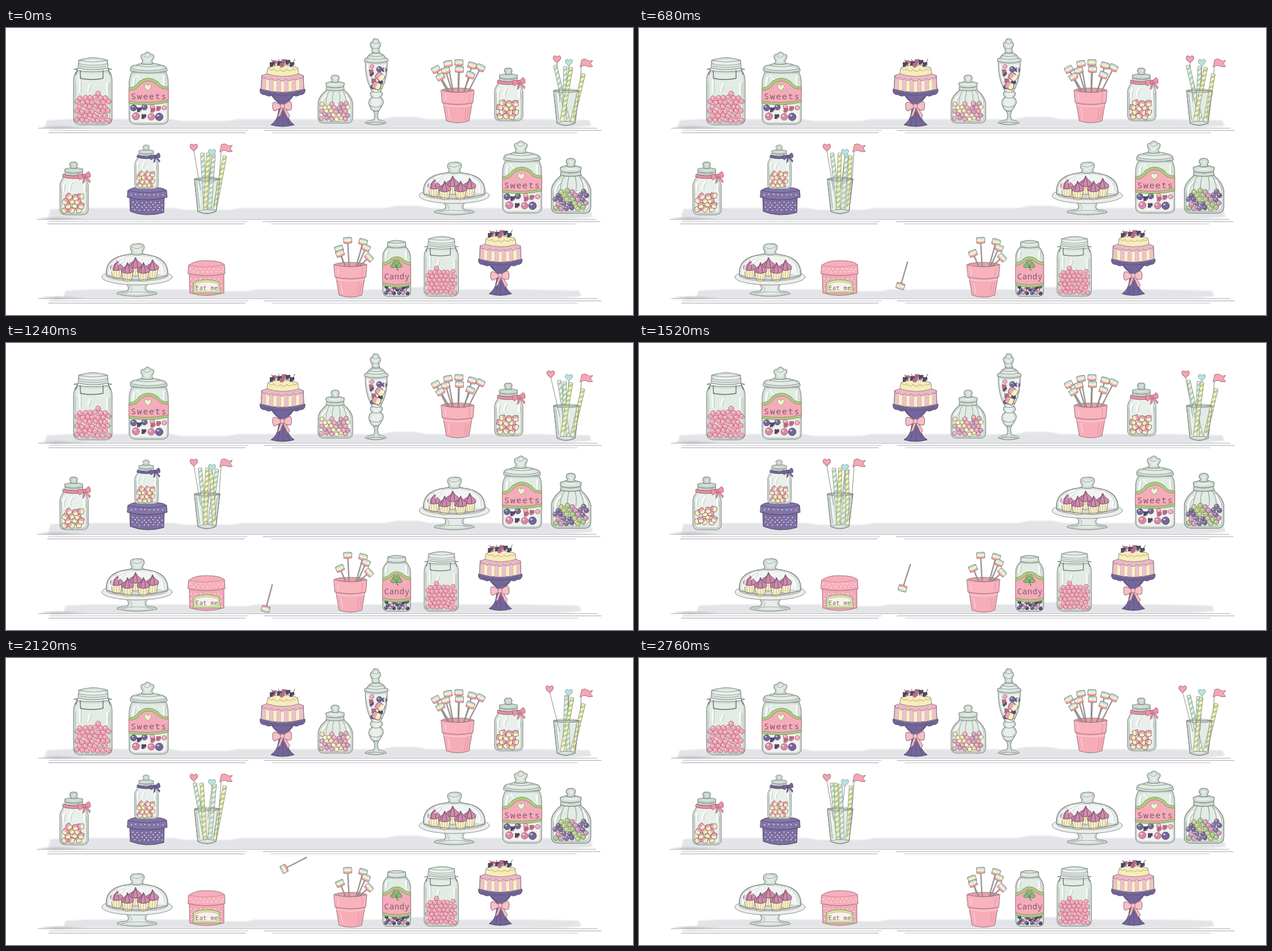
Recreate the animation shown at these times as an HTML page with a canvas. Size 1105 by 507 pixels, loop 2.8 s.

```html
<!DOCTYPE html>
<html lang="en">
<head>
<meta charset="utf-8">
<title>Candy shelves</title>
<style>
html,body{margin:0;width:100%;height:100%;overflow:hidden;background:#fff}
canvas{display:block;width:100vw;height:100vh}
</style>
</head>
<body>
<canvas></canvas>
<script>
const W = 1105, H = 507, LOOP = 2800, STEP = 40;
const canvas = document.querySelector('canvas'), g = canvas.getContext('2d');
const dpr = window.devicePixelRatio || 1;
canvas.width = W * dpr;
canvas.height = H * dpr;

const INK = '#7d8581', GLASS = '#e2ebe4', CLEAR = '#f1f4f2', PINK = '#f5acba', ROSE = '#f2a5b6', CREAM = '#f8f2c4',
  MINT = '#b9e3df', GREEN = '#a9d07c', VIOLET = '#74669a', DARK = '#4b4263';
const HAND = '"Noto Sans Mono","DejaVu Sans Mono",monospace';

let seed = 1;
const rnd = () => (seed = seed * 16807 % 2147483647) / 2147483647;
const jit = a => (rnd() - .5) * 2 * a;

function shape(d, fill, stroke = INK, w = 1) {
  const p = new Path2D(d);
  if (fill) { g.fillStyle = fill; g.fill(p); }
  if (stroke) { g.strokeStyle = stroke; g.lineWidth = w; g.stroke(p); }
}
// glass wall: darker towards its edge
function vessel(d, fill = GLASS) {
  shape(d, fill, null);
  g.save();
  g.clip(new Path2D(d));
  shape(d, null, 'rgba(125,150,135,.2)', 7);
  g.restore();
  shape(d, null, INK, 1.1);
}
function oval(x, y, rx, ry, fill, stroke, w = .9) {
  g.beginPath();
  g.ellipse(x, y, rx, ry, 0, 0, 7);
  if (fill) { g.fillStyle = fill; g.fill(); }
  if (stroke) { g.strokeStyle = stroke; g.lineWidth = w; g.stroke(); }
}
function at(x, y, s, a, draw) {
  g.save();
  g.translate(x, y);
  g.rotate(a);
  g.scale(s, s);
  draw();
  g.restore();
}
function write(s, x, y, size, gap) {
  g.font = '300 ' + size + 'px ' + HAND;
  g.letterSpacing = gap + 'px';
  g.textAlign = 'left';
  g.fillStyle = '#7d5c6a';
  g.fillText(s, x, y);
}
function ball(x, y, r, fill, edge = '#a9566f') {
  oval(x, y, r, r, fill, edge, .8);
  oval(x - r * .3, y - r * .35, r * .32, r * .25, 'rgba(255,255,255,.65)');
}
function pile(x0, x1, bottom, top, dx, dy, put) {
  for (let y = bottom, odd = 0; y >= top; y -= dy, odd ^= 1)
    for (let x = x0 + odd * dx / 2; x <= x1; x += dx) {
      const px = x + jit(1.1), py = y + jit(1.3);
      if (py >= top + 5 * Math.abs(Math.sin(x * .13))) put(px, py);
    }
}
// soft pencil streaks inside glass
function sheen(d) {
  shape(d, null, 'rgba(255,255,255,.75)', 3);
  g.save();
  g.translate(2.5, 1);
  shape(d, null, 'rgba(110,120,115,.4)', .9);
  g.restore();
}
function berry(x, y) {
  for (let i = 0; i < 8; i++)
    oval(x + (i % 3 - 1) * 2.5, y + (i / 3 | 0) * 2.5 - 3, 1.8, 1.8, i % 2 ? '#5f5478' : '#40394f');
}
function raspberry(x, y) {
  for (let i = 0; i < 8; i++)
    oval(x + (i % 3 - 1) * 2.4, y + (i / 3 | 0) * 2.4 - 3, 1.7, 1.7, '#cf7f9c', '#84465f', .5);
}
function heart(x, y, s, fill, edge) {
  at(x, y, s, 0, () => shape('M0 6Q-8 0 -6 -4Q-3 -8 0 -3Q3 -8 6 -4Q8 0 0 6Z', fill, edge));
}
function bow(x, y, s, fill, edge, tilt = 0) {
  at(x, y, s, tilt, () => {
    shape('M-2 2L-7 16L-3 14L1 3L8 18L11 14L3 1Z', fill, edge, .9);
    shape('M0 0Q-12 -9 -14 -4Q-15 7 -11 7Q-6 5 0 1Q8 8 13 5Q15 -7 10 -7Q5 -5 0 0Z', fill, edge);
    oval(0, 0, 3, 3.4, fill, edge);
  });
}

function shelf(y, x, washTop, from, to) {
  g.filter = 'blur(.8px)';
  shape(`M${from} ${washTop + 2}L${from + 40} ${washTop}H${from + 220}L${from + 235} ${washTop + 3}H${from + 320}L${from + 335} ${washTop}
    H${from + 590}L${from + 610} ${washTop - 4}H${from + 650}L${from + 670} ${washTop}H${to - 90}L${to} ${washTop + 2}L${to + 4} ${y - 4}L${to - 40} ${y - 1}H${from - 4}Z`, '#e3e4e7', null);
  shape(`M${x + 2} ${y - 2}L${x + 35} ${y - 4}L${x + 85} ${y - 1}L${x + 30} ${y + 1}Z`, '#c9cacd', null);
  g.filter = 'none';
  const line = (a, b, yy, w, col) => shape(`M${a} ${yy}L${b} ${yy}`, null, col, w);
  line(x, x + 985, y, 1.1, '#a8a5ad');
  line(x + 20, x + 370, y + 4, 1, '#b8b5bd');
  line(x + 398, x + 992, y + 4, 1.2, '#a09da8');
  line(x + 18, x + 365, y + 8, 1, '#9d99a4');
  line(x + 412, x + 950, y + 8, 1, '#bbb9c1');
}

function mason(x, y, s) {
  at(x, y, s, 0, () => {
    vessel('M8 24Q1 30 1 42V110Q2 119 12 120H58Q68 119 69 110V42Q69 30 62 24Q35 28 8 24Z');
    sheen('M12 34V62M60 46V66M30 48L26 60');
    pile(8, 63, 112, 62, 9, 8, (a, b) => ball(a, b, 4.4, ROSE));
    shape('M5 44V110Q8 117 14 117H56Q65 116 65 108V46', null, '#a9b2ac', .8);
    vessel('M10 6Q36 -3 61 6L62 20Q36 26 9 20Z', '#e9f0eb');
    shape('M10 6Q36 12 61 6M10 12Q36 18 62 12M12 16Q40 21 58 16', null, INK, .8);
    shape('M13 24V38Q33 42 53 38V24M2 22L8 21L5 31M68 22L62 21L66 31', null, '#66706c', 1.4);
  });
}

function sweets(x, y) {
  at(x, y, 1, 0, () => {
    vessel('M6 36Q1 45 1 55V118Q2 127 12 128H60Q70 127 70 118V55Q70 45 66 36Z');
    sheen('M10 46L8 60M62 44V58M16 42L24 50');
    shape('M4 94H67V118Q66 124 58 124H12Q4 124 4 118Z', '#f3f2ee', null);
    ball(9, 99, 5.5, VIOLET, DARK); ball(28, 98, 5, VIOLET, DARK); ball(42, 97, 4, PINK);
    ball(13, 114, 6.5, '#d58ba9'); ball(54, 115, 6.8, VIOLET, DARK); ball(63, 99, 4, PINK);
    ball(40, 115, 6, '#d58ba9'); raspberry(43, 104); raspberry(53, 101); berry(27, 115); berry(19, 103); 
    shape('M1 64Q12 63 18 53Q35 40 52 53Q58 63 70 62V89Q35 97 1 91Z', GREEN, '#7c9a5d');
    shape('M1 68Q15 68 21 57Q35 46 49 57Q56 67 70 66V85Q35 93 1 87Z', PINK, '#b77a86');
    heart(34, 63, .95, '#eef3d8', '#8fae5e');
    write('Sweets', 4, 84, 15, 1.7);
    vessel('M3 34Q2 24 14 23Q34 16 56 23Q68 25 68 34Q35 41 3 34Z', '#e4ece6');
    shape('M5 30Q35 37 66 30M14 24Q34 29 56 24', null, INK, .8);
    vessel('M22 21Q27 16 23 13Q19 4 28 4Q33 -3 39 4Q48 5 43 13Q39 17 44 21Q33 24 22 21Z');
    shape('M27 8Q33 13 39 7', null, INK, .7);
  });
}

function cake(x, y, s) {
  at(x, y, s, 0, () => {
    shape('M1 56Q-1 66 10 66Q16 70 21 67Q26 75 33 80L35 85L33 97Q31 112 20 119Q40 125 61 119Q50 112 48 97L46 85L48 80Q55 75 60 67Q65 70 71 66Q81 66 80 56Q40 67 1 56Z', VIOLET, DARK);
    shape('M36 98L32 120M41 98V121M45 98L52 119M22 67L34 79M59 67L48 78M8 62Q40 72 73 62', null, '#5a4e80', .9);
    g.save();
    const side = 'M4 32Q40 18 77 32L78 56Q40 67 3 56Z';
    shape(side, CREAM);
    g.clip(new Path2D(side));
    for (let i = 0; i < 6; i++) shape(`M${5 + i * 13} 26L${3 + i * 13.5} 67H${10 + i * 13.5}L${11 + i * 13} 26Z`, '#f0c0cd', '#cfa3b0', .7);
    g.restore();
    shape(side, null, '#8c7f80');
    shape('M4 32Q40 16 77 32Q76 40 70 36Q66 43 59 37Q53 45 46 38Q40 46 33 38Q27 44 21 37Q15 43 11 36Q5 40 4 32Z', '#ecb6c6', '#8f7a82', .9);
    shape('M15 18Q40 8 67 18L69 29Q42 38 13 29Z', '#f6edbb', '#8f8878');
    shape('M15 18Q20 25 25 20Q31 28 36 21Q42 28 48 21Q54 27 59 20Q64 25 67 18', null, '#cdb58c', 1.2);
    shape('M21 4L27 14M62 3L57 13M33 3L36 9', null, '#7d965c', 1.3);
    raspberry(26, 10); berry(35, 11); raspberry(43, 8); berry(50, 9); berry(57, 13); berry(22, 13); raspberry(40, 14);
    bow(40, 86, 1.2, '#f5c0c7', '#a8747f');
  });
}

function roundJar(x, y, s, colors, hop) {
  at(x, y, s, 0, () => {
    vessel('M18 26Q2 38 1 50V78Q2 85 10 86H54Q61 85 62 78V50Q60 38 45 26Z');
    sheen('M14 38Q7 44 7 54M50 36Q56 44 56 50');
    shape('M22 27Q14 40 15 54M29 27Q25 40 26 52M37 27Q41 38 39 52M43 27Q52 40 50 52', null, '#8d9992', .9);
    shape('M5 58Q31 48 58 58V76Q57 82 50 82H12Q5 81 5 76Z', 'rgba(246,247,245,.8)', null);
    let i = 0;
    pile(8, 56, 78, 48, 8.4, 6.4, (a, b) => ball(a, b, 3.9, colors[i++ * 7 % 5], '#7a6672'));
    if (hop) ball(39 + 6 * hop / 20, 54 - hop * .85, 3.9, PINK, '#8a5565');
    vessel('M16 21Q31 26 46 21L47 27Q31 31 15 27Z', '#e5ede7');
    vessel('M15 15Q31 9 47 15Q48 21 44 22Q31 25 17 22Q14 19 15 15Z', '#e5ede7');
    vessel('M24 13Q28 10 24 8Q23 1 31 1Q39 1 38 8Q35 11 38 13Q31 16 24 13Z');
    shape('M4 52V77Q8 83 14 83H50Q58 82 59 76', null, '#9eaaa3', .8);
  });
}

function urn(x, y) {
  at(x, y, 1, 0, () => {
    vessel('M15 128Q20 136 16 144Q2 146 1 150Q19 156 38 150Q37 146 25 144Q21 136 25 128Z');
    vessel('M1 41Q20 45 40 41Q41 68 31 88L28 94Q35 98 28 104Q37 111 30 120Q26 130 20 129Q12 130 9 120Q4 111 13 104Q7 98 13 94L10 88Q1 70 1 41Z', '#e9f0eb');
    shape('M10 88Q20 93 31 88M13 94Q20 98 28 94M13 104Q20 108 28 104M9 119Q20 125 30 119M5 150Q19 146 34 150', null, INK, .9);
    berry(12, 64); berry(28, 80); ball(26, 55, 5, VIOLET, DARK); ball(13, 50, 3.5, PINK); ball(35, 56, 4, '#625a85', DARK);
    raspberry(11, 60); raspberry(16, 76); ball(14, 86, 3.5, '#625a85', DARK);
    [[27, 68, .7], [21, 84, .4]].forEach(([a, b, r]) => at(a, b, 1.5, r, mallow));
    sheen('M5 48Q6 62 11 76M36 48Q36 62 32 72');
    vessel('M0 41Q-2 36 4 35Q8 26 20 25Q33 26 37 35Q43 36 41 41Q20 47 0 41Z');
    shape('M4 35Q20 40 37 35M9 31Q20 34 32 31', null, INK, .8);
    vessel('M13 25Q14 20 12 17Q7 9 14 6Q15 0 20 1Q25 1 25 6Q31 10 26 17Q24 20 27 25Q20 28 13 25Z');
    shape('M14 8Q19 12 25 8M12 17Q19 20 26 17', null, INK, .7);
  });
}

function pop(x, y, angle, len = 43) {
  at(x, y, 1, angle, () => {
    shape(`M3 0H${len}`, null, '#77716f', 2.2);
    shape(`M4 0H${len - 1}`, null, '#c3bbb3', .8);
    ['#f2a6b4', CREAM, MINT].forEach((c, i) => shape(`M${4 - i * 3.6} -7Q${5.5 - i * 3.6} 0 ${4 - i * 3.6} 7H${.2 - i * 3.6}Q${1.6 - i * 3.6} 0 ${.2 - i * 3.6} -7Z`, c, null));
    shape('M4 -7Q5.6 0 4 7H-5.5Q-7.5 0 -5.5 -7Z', null, '#857572', .9);
  });
}
function pot(x, y, heads) {
  at(x, y, 1, 0, () => {
    oval(30, 4, 28, 4, '#e5a0ac', '#9a6b75');
    heads.forEach(([a, b]) => {
      const bx = 30 + (a - 30) * .45, dx = bx - a, dy = 8 - b;
      pop(a, b, Math.atan2(dy, dx), Math.hypot(dx, dy));
    });
    shape('M4 23L10 58Q30 65 50 58L56 23Z', '#f6adb8', '#98707a');
    shape('M1 4Q30 12 59 4L57 26Q30 32 3 26Z', '#f8b3bd', '#98707a');
    shape('M4 30Q30 36 55 30M8 12L9 22M13 36L16 54', null, 'rgba(255,255,255,.4)', 1.6);
    shape('M45 36L42 56M50 36L46 56M51 10L50 24', null, '#e595a3', 1.1);
  });
}

function mallow() {
  shape('M0 -4H-4Q-6 0 -4 4H0Z', '#f0a3b3', null);
  shape('M0 -4H4Q6 0 4 4H0Z', '#f7f0bd', null);
  shape('M-4 -4H4Q6 0 4 4H-4Q-6 0 -4 -4Z', null, '#7d6868', .8);
}
function bowJar(x, y, s, ribbon, edge, hop = 0) {
  at(x, y, s, 0, () => {
    vessel('M8 27Q1 36 1 42V86Q2 93 10 94H42Q50 93 51 86V42Q50 36 44 27Z', '#e9f0eb');
    sheen('M9 38Q6 44 7 52M44 38V52M22 36Q16 44 18 50');
    pile(10, 44, 86, 54, 11.5, 7.8, (a, b) => {
      const up = rnd(), turn = rnd() * 3;
      at(a, b - hop * up * 15, 1.12, turn + hop * up, mallow);
    });
    shape('M4 44V85Q6 91 12 91H42Q48 90 48 84V44', null, '#98a49c', .8);
    vessel('M10 18Q25 23 41 18V24H10Z');
    vessel('M10 13Q25 8 41 13Q42 18 39 19Q25 22 12 19Q8 17 10 13Z', '#d9e3dc');
    vessel('M19 11Q22 9 18 6Q19 0 25 1Q32 0 32 6Q29 9 32 11Q25 14 19 11Z', '#d9e3dc');
    shape('M7 22Q25 29 45 22L46 27Q25 33 6 27Z', ribbon, edge);
    bow(44, 25, .8, ribbon, edge, -.2);
  });
}

const KEYS = [0, 360, 960, 1240, 1760, 2120, 2760];
function pose(v, t) {
  let i = 0;
  while (i < 5 && t >= KEYS[i + 1]) i++;
  const u = Math.min(1, (t - KEYS[i]) / (KEYS[i + 1] - KEYS[i]));
  return v[i] + (v[i + 1] - v[i]) * (1 - Math.cos(Math.PI * u)) / 2;
}
function straw(x0, y0, x1, y1, color) {
  const len = Math.hypot(x1 - x0, y1 - y0);
  at(x0, y0, 1, Math.atan2(y1 - y0, x1 - x0) - Math.PI / 2, () => {
    shape(`M-3 0H3V${len}H-3Z`, '#faf4d0', null);
    for (let y = 1; y < len - 7; y += 9) shape(`M-3 ${y + 4}L3 ${y}V${y + 4.5}L-3 ${y + 8.5}Z`, color, null);
    shape(`M-3 0H3V${len}H-3Z`, null, '#858a7e', .8);
  });
}
function glass(x, y, t, straws, red, mint, flag) {
  at(x, y, 1, 0, () => {
    const cup = 'M1 3L7 60Q23 68 39 60L46 3Z';
    vessel(cup);
    const stick = (a, b, c, d) => shape(`M${a} ${b}L${c} ${d}`, null, '#8b8a88', 1);
    stick(red, -48, 12, 22);
    stick(mint[0], mint[1] + 5, 25, 20);
    stick(flag[0], flag[1], flag[0] - 5, 10);
    straws.forEach(([top, end, high, color]) => straw(pose(top, t), high, end, 57, color));
    heart(red, -53, 1.05, '#f6a3b1', '#a8707b');
    heart(mint[0], mint[1], 1, MINT, '#7fa5a4');
    at(flag[0], flag[1], 1, 0, () => shape('M0 0Q6 -3 10 1Q14 4 19 1L15 7L19 12Q13 14 8 11Q3 9 -3 13Z', '#f6a6b4', '#a8707b'));
    shape(cup, 'rgba(226,238,230,.12)');
    oval(23.5, 3, 22.5, 3, null, INK);
    shape('M5 8L10 54M41 9L36 52M9 59Q23 54 37 59', null, '#96a29b', .9);
    shape('M8 12L12 46', null, 'rgba(255,255,255,.6)', 1.6);
  });
}

function cupcake(x, y) {
  at(x, y, 1, 0, () => {
    shape('M-10 0L-7 16Q0 19 7 16L10 0Z', '#f8f0c8', '#7d7364', .9);
    shape('M-5 3L-4 16M0 3V17M5 3L4 16', null, '#bfb287', .9);
    shape('M-10 1Q-13 -5 -6 -7Q-1 -10 0 -16Q3 -10 7 -7Q13 -4 10 1Q0 6 -10 1Z', '#cd8bad', '#654358', .9);
    shape('M-4 2Q-5 -5 0 -13M3 2Q5 -4 0 -13M-8 0Q-7 -5 -3 -8', null, '#824a6c', 1);
  });
}
function dome(x, y) {
  at(x, y, 1, 0, () => {
    vessel('M43 72Q52 82 44 86Q26 87 28 91Q62 99 98 91Q99 87 82 86Q74 82 83 72Z', '#e6ece8');
    shape('M35 90Q62 84 92 90M50 76Q57 82 52 87', null, '#98a39c', .9);
    oval(63, 61, 62, 14, '#eceeec', INK);
    oval(63, 58, 54, 10, '#d3d6d4', '#8e9691');
    const bell = 'M9 58Q5 21 63 20Q120 21 117 58Q63 74 9 58Z';
    vessel(bell, CLEAR);
    oval(63, 60, 46, 7, '#d6d9d7');
    cupcake(60, 42);
    cupcake(27, 46); cupcake(90, 46);
    cupcake(46, 51); cupcake(74, 51);
    shape(bell, null, INK, 1.1);
    sheen('M18 50Q18 32 40 26M108 52Q110 36 92 27M30 38L40 29');
    vessel('M52 20Q56 16 52 13Q48 2 62 2Q79 1 75 12Q71 17 74 20Q63 24 52 20Z');
    shape('M54 8Q63 14 73 7', null, INK, .7);
  });
}

function dots(x0, y0, x1, y1) {
  for (let y = y0, k = 0; y <= y1; y += 4.5, k ^= 1)
    for (let x = x0 + k * 4; x <= x1; x += 8) oval(x + jit(1), y + jit(.8), .95, .95, '#fff');
}
function boxes() {
  shape('M218 299L219 324Q247 335 278 326L279 299Z', '#7d6ea1', DARK);
  shape('M215 287Q222 280 248 281Q278 281 283 287L284 299Q248 308 214 299Z', '#8475a8', DARK);
  shape('M215 287Q248 295 283 287', null, '#5a4b80');
  dots(221, 294, 277, 298);
  dots(223, 308, 275, 324);
  shape('M323 434L324 468Q352 477 384 468L384 434Z', '#f4a8b7', '#95707a');
  shape('M322 419Q334 410 354 411Q378 411 385 418L386 434Q352 441 321 434Z', '#f6aebb', '#95707a');
  shape('M322 419Q352 426 385 418', null, '#d5899a');
  dots(326, 426, 382, 433);
  dots(327, 443, 380, 468);
  shape('M331 449Q353 440 376 449L378 468H330Z', '#d6e5a5', '#7d9a5c');
  shape('M334 452Q353 445 374 452V465H333Z', '#fbf1ec', '#9bb377', .7);
  write('Eat me', 334, 463, 10.5, .35);
}

function candyJar(x, y) {
  at(x, y, 1, 0, () => {
    vessel('M9 13Q1 20 1 30V91Q2 99 9 100H42Q50 99 50 91V30Q49 20 42 13Z');
    sheen('M8 20L6 32M42 20V32');
    let i = 0;
    pile(7, 46, 94, 79, 7.4, 5.2, (a, b) => ball(a, b, 3, ['#6a618f', PINK, '#4c4560'][i++ % 3], DARK));
    shape('M1 41Q10 39 14 34Q25 26 37 34Q41 39 50 40V80Q25 88 1 80Z', GREEN, '#7c9a5d');
    shape('M1 46Q13 43 17 38Q25 31 34 38Q38 43 50 45V76Q25 83 1 76Z', PINK, '#b77a86');
    [[-.95, -6, 1], [.95, 6, 1], [0, 0, -5]].forEach(([r, a, b]) => at(25 + a * .8, 45 + b * .8, .78, r, () => heart(0, 0, 1, '#8abd76', '#50804a')));
    shape('M25 47Q25 51 28 54', null, '#50804a', 1.4);
    write('Candy', 3.5, 70, 14, .6);
    vessel('M10 4Q25 -2 41 4L42 12Q25 17 9 12Z');
    shape('M10 4Q25 9 41 4', null, INK, .8);
  });
}

const mix = (a, b, u) => a + (b - a) * u;
// the marshmallow pop that leaves its pot, bounces and returns
function jumper(t) {
  const home = [587, 391, 72], ground = [458, 469, -75];
  const ease = u => (1 - Math.cos(Math.PI * u)) / 2;
  const go = (a, b, u, v) => [mix(a[0], b[0], u), mix(a[1], b[1], v), mix(a[2], b[2], u)];
  const out = [527, 359, 20], back = [491, 372, -27];
  let p = home;
  if (t < 360) p = go(home, out, t / 360, Math.sin(Math.PI / 2 * t / 360));
  else if (t < 600) { const u = (t - 360) / 240; p = go(out, ground, u, u * u); }
  else if (t < 1880) {
    const second = t >= 1240, u = (t - (second ? 1240 : 600)) / 640, k = 4 * u * (1 - u);
    p = [458 + 7 * k, 469 - (second ? 37 : 32) * k, -75 + 3 * k];
  } else if (t < 2120) { const u = (t - 1880) / 240; p = go(ground, back, u, Math.sin(Math.PI / 2 * u)); }
  else if (t < 2480) {
    const u = (t - 2120) / 360;
    p = go(back, home, u, ease(u));
    p[1] -= 18 * Math.sin(Math.PI * u);
  }
  pop(p[0], p[1], p[2] * Math.PI / 180);
}

const AQUA = '#9ed6d0', LIME = '#bcd27c';
const STRAWS_TOP = [
  [[4, 4, 3, 11, -1, 24, 5], 27, -42, AQUA],
  [[22, 22, 26, 21, 24, 24, 22], 20, -40, AQUA],
  [[32, 34, 36, 32, 26, 34, 27], 16, -38, LIME],
  [[54, 54, 44, 53, 54, 54, 54], 34, -27, LIME]
];
const STRAWS_MID = [
  [[15, 16, 4, 11, 14, 2, 9], 21, -43, AQUA],
  [[26, 24, 22, 24, 24, 14, 16], 20, -43, LIME],
  [[35, 32, 37, 41, 33, 37, 24], 28, -41, AQUA],
  [[55, 41, 43, 30, 40, 55, 43], 37, -38, LIME]
];
const RED_HEART = [7, 7, 7, -4, 2, -6, -6];
const POPS_TOP = [[13, -42], [32, -44], [55, -39], [70, -35], [-8, -32], [9, -30], [33, -32], [52, -22], [0, -19]];
const POPS_LOW = [[25, -38], [52, -35], [57, -25], [62, -8], [12, -15]];

function draw(t) {
  seed = 77;
  g.setTransform(dpr, 0, 0, dpr, 0, 0);
  g.fillStyle = '#fff';
  g.fillRect(0, 0, W, H);
  g.lineJoin = g.lineCap = 'round';

  const p = (t % 1400) / 720;
  const hop = p < 1 ? Math.sin(Math.PI * p) : 0;

  shelf(177, 57, 161, 72, 1028);
  shelf(338, 55, 318, 78, 1030);
  shelf(478, 57, 462, 105, 1010);

  mason(118, 51, 1);
  sweets(216, 42);
  cake(447, 52, 1);
  roundJar(549, 82, 1, [PINK, CREAM, '#d79abf', '#f3e3b0', '#e9a9b5'], hop * (t < 1400 ? 20 : 11));
  urn(632, 18);
  pot(766, 106, POPS_TOP);
  bowJar(860, 70, 1, '#ef91a5', '#955b69');
  glass(964, 108, t, STRAWS_TOP, pose(RED_HEART, t), [28, -47], [51, -52]);

  bowJar(94, 236, 1, '#ef91a5', '#955b69', hop);
  boxes();
  bowJar(226, 206, .83, '#75659d', DARK);
  glass(331, 264, t, STRAWS_MID, 0, [32, -44], [49, -58]);
  dome(727, 235);
  sweets(874, 199);
  roundJar(960, 229, 1.14, [GREEN, VIOLET, '#d698bf', '#b9d67c', '#8474a0']);

  dome(168, 379);
  jumper(t);
  pot(577, 414, POPS_LOW);
  candyJar(663, 374);
  mason(736, 367, .89);
  cake(832, 354, .97);
}

const start = performance.now();
let last = -1;
function tick() {
  const n = Math.floor((performance.now() - start) % LOOP / STEP);
  if (n !== last) draw((last = n) * STEP);
  requestAnimationFrame(tick);
}
tick();
</script>
</body>
</html>
```
